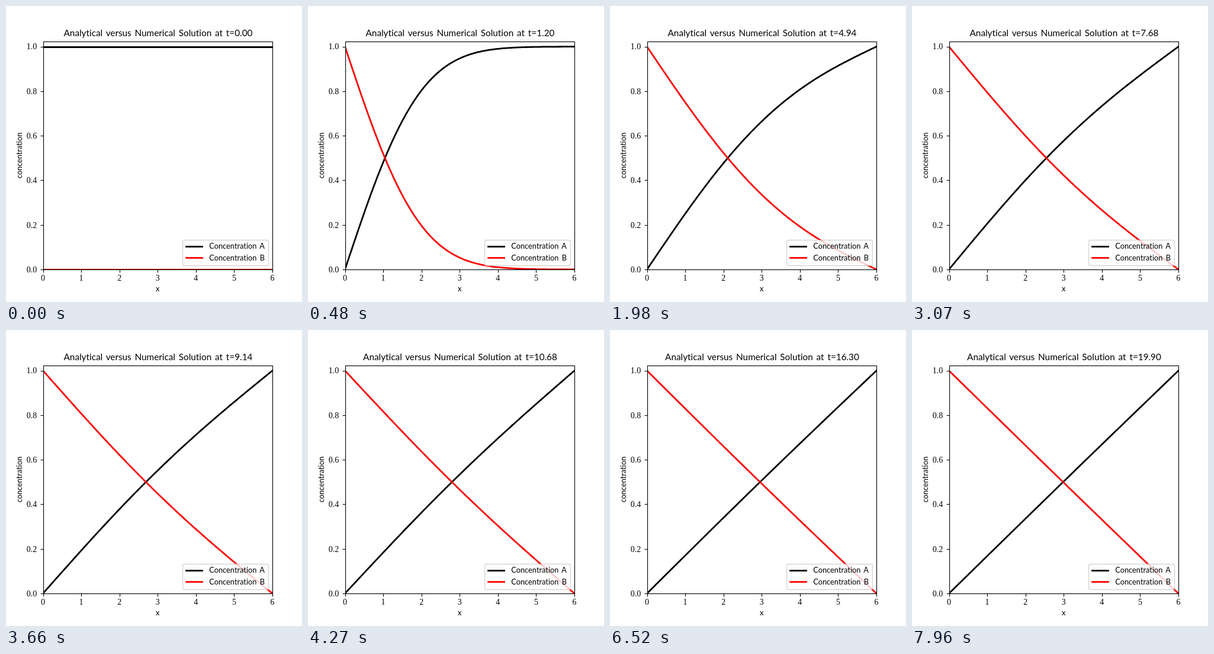
An HTML page that plays this animation: 500 by 500 pixels, repeating every 7990 ms.

```html
<!DOCTYPE html>
<html lang="en">
<head>
<meta charset="utf-8">
<title>Diffusion</title>
<style>
  html, body { margin: 0; width: 100%; height: 100%; overflow: hidden; background: #fff; }
  svg { display: block; width: 500px; height: 500px; }
  text { font: 12.8px Lato, sans-serif; font-variant-ligatures: none; word-spacing: 2px; text-anchor: middle; }
  #title { font-size: 15.3px; word-spacing: 1.9px; }
  .tick { font: 13.89px "Liberation Serif", serif; }
  .axis { fill: none; stroke: #000; stroke-width: 1.11; }
  .line { fill: none; stroke-width: 2.78; stroke-linecap: square; stroke-linejoin: round; }
  .a { stroke: #000; }
  .b { stroke: #f00; }
  .legend text { text-anchor: start; }
</style>
</head>
<body>
<svg viewBox="0 0 500 500">
  <clipPath id="plot"><rect x="63" y="60" width="387" height="385"/></clipPath>
  <g clip-path="url(#plot)">
    <path id="lineA" class="line a"/>
    <path id="lineB" class="line b"/>
  </g>
  <rect class="axis" x="63.5" y="60.5" width="387" height="385"/>
  <g id="ticks"></g>
  <text id="title" x="257" y="51"></text>
  <text x="256.3" y="482">x</text>
  <text transform="translate(27 252.5) rotate(-90)">concentration</text>
  <g class="legend">
    <rect x="298.5" y="395.5" width="145" height="43" rx="2.8" fill="#fff" stroke="#ccc" stroke-width="1.39" opacity=".8"/>
    <path class="line a" d="M304.5 406.5h27"/>
    <path class="line b" d="M304.5 425.5h27"/>
    <text x="343.3" y="410.3">Concentration A</text>
    <text x="343.3" y="430">Concentration B</text>
  </g>
</svg>
<script>
const LOOP = 7990, FRAME = 26.711, LENGTH = 6, TERMS = 40, SAMPLES = 200;
const $ = id => document.getElementById(id);
const px = x => 62.5 + x * 387.5 / LENGTH;
const py = y => 445 - y * 385 / 1.023;
const snap = v => Math.floor(v + 0.5) + 0.5;

function buildTicks() {
  let out = '';
  for (let i = 0; i <= 6; i++) {
    out += `<path class="axis" d="M${snap(px(i))} 445.5v5"/>
      <text class="tick" x="${px(i)}" y="464.4">${i}</text>`;
  }
  for (let i = 0; i <= 5; i++) {
    const y = py(i / 5);
    out += `<path class="axis" d="M63.5 ${snap(y)}h-5"/>
      <text class="tick" x="43.4" y="${y + 4.8}">${(i / 5).toFixed(1)}</text>`;
  }
  $('ticks').innerHTML = out;
}

// Diffusion with B = 1 at the left wall and 0 at the right.
function concentrationB(x, t) {
  let sum = 1 - x / LENGTH;
  for (let n = 1; n <= TERMS; n++) {
    const k = n * Math.PI / LENGTH;
    sum -= 2 / (n * Math.PI) * Math.sin(k * x) * Math.exp(-k * k * t);
  }
  return sum;
}

function curve(f) {
  const points = [];
  for (let i = 0; i <= SAMPLES; i++) {
    const x = i * LENGTH / SAMPLES;
    points.push(px(x).toFixed(2) + ' ' + py(f(x)).toFixed(2));
  }
  return 'M' + points.join('L');
}

// Level lines sit on whole pixels.
const level = y => `M62.5 ${snap(py(y))}H450`;

let shown = -1;
function draw(now) {
  const ticks = Math.floor(now % LOOP / 10);
  const frame = Math.ceil((ticks + 0.5) * 10 / FRAME) - 1;
  if (frame !== shown) {
    shown = frame;
    const t = Math.round(frame * FRAME / 8) * 0.02;
    $('title').textContent = `Analytical versus Numerical Solution at t=${t.toFixed(2)}`;
    $('lineA').setAttribute('d', t ? curve(x => 1 - concentrationB(x, t)) : level(1));
    $('lineB').setAttribute('d', t ? curve(x => concentrationB(x, t)) : level(0));
  }
}

buildTicks();
draw(0);
let start;
requestAnimationFrame(function loop(now) {
  start ??= now;
  draw(now - start);
  requestAnimationFrame(loop);
});
</script>
</body>
</html>
```
